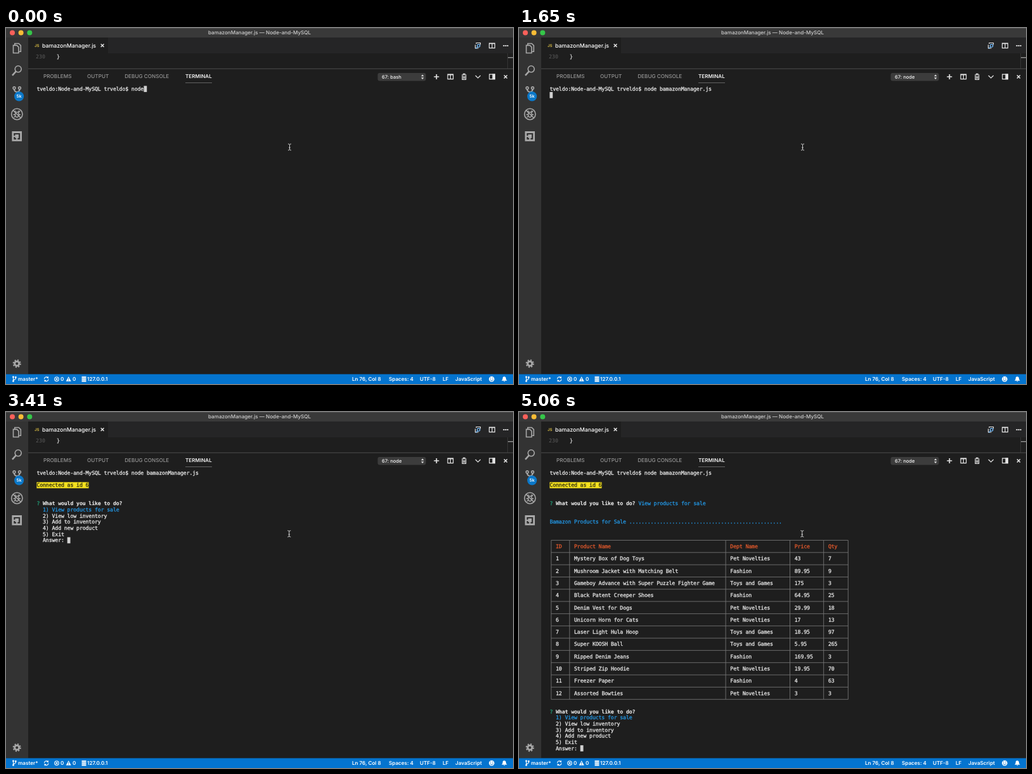
These frames come from a looping animation (800 by 562 pixels, 8 s). An HTML page:

```html
<!DOCTYPE html>
<html lang="en">
<head>
<meta charset="utf-8">
<title>Terminal session</title>
<style>
  html, body { margin: 0; width: 100%; height: 100%; overflow: hidden; background: #1e1e1e; }
  svg { display: block; width: 800px; height: 562px; }
  text { font-family: Inter, "Open Sans", sans-serif; font-size: 8.28px; white-space: pre; text-rendering: geometricPrecision; }
  .mono { font-family: "DejaVu Sans Mono", monospace; }
  #term text { font-family: "DejaVu Sans Mono", monospace; letter-spacing: -.155px; fill: currentColor; stroke: currentColor; stroke-width: .28px; }
  #term .bold { font-weight: 700; stroke-width: .1px; }
  .line { fill: none; stroke: #e4e4e4; stroke-width: 1.2; }
  .side { fill: none; stroke: #a8a8a8; stroke-width: 1.6; }
  .tabs { fill: #969696; font-weight: 500; }
  .tabs text { font-size: 8.18px; }
  .status { fill: #fff; font-weight: 600; }
  .status text { font-size: 8.1px; }
  .status .line { stroke: #fff; stroke-width: 1.1; }
</style>
</head>
<body>
<svg viewBox="0 0 800 562">
  <rect width="800" height="562" fill="#1e1e1e"/>

  <!-- title bar and editor -->
  <rect width="800" height="15" fill="#393939"/>
  <rect width="800" height=".8" fill="#555"/>
  <circle cx="10" cy="7.5" r="4" fill="#f9605a"/>
  <circle cx="23.6" cy="7.5" r="4" fill="#f8bc36"/>
  <circle cx="37.3" cy="7.5" r="4" fill="#35c649"/>
  <text x="319" y="10.4" fill="#d0d0d0" font-weight="500" style="font-size:8.15px">bamazonManager.js — Node-and-MySQL</text>
  <rect x="35" y="15" width="765" height="25" fill="#252526"/>
  <rect x="35" y="15" width="126" height="25" fill="#1e1e1e"/>
  <text x="45" y="30.4" fill="#cbb141" font-weight="700" style="font-size:6.2px">JS</text>
  <text x="57" y="30.8" fill="#fff" font-weight="500" style="font-size:8.8px">bamazonManager.js</text>
  <path class="line" d="M149.7 25.2l4.8 4.8m0-4.8l-4.8 4.8" style="stroke-width:1.5"/>
  <text class="mono" x="47" y="48.3" fill="#5a5a5a">230</text>
  <text class="mono" x="80" y="48.3" fill="#d4d4d4" stroke="#d4d4d4" stroke-width=".3">}</text>
  <path d="M791.5 40v24" stroke="#343434"/>
  <path d="M792 46.7h8" stroke="#a0a0a0" stroke-width="1.3"/>
  <path d="M35 64.3h765" stroke="#4b4b4b"/>

  <!-- editor actions -->
  <g class="line">
    <path d="M742 25v-1.5h6.5v3M740.5 26.5v5.5h5"/>
    <circle cx="745.6" cy="28" r="2.2" stroke="#75beff"/>
    <path d="M744 29.8l-2.6 2.7" stroke="#75beff"/>
    <path d="M762.5 24h8.8v7.6h-8.8zM767 24v7.6M762.5 24.7h8.8"/>
  </g>
  <path d="M784.5 28h8" stroke="#e4e4e4" stroke-width="2" stroke-dasharray="2 1"/>

  <!-- panel header -->
  <g class="tabs">
    <text x="59" y="78.8">PROBLEMS</text>
    <text x="128" y="78.8">OUTPUT</text>
    <text x="187.2" y="78.8">DEBUG CONSOLE</text>
    <text x="283" y="78.8" fill="#f2f2f2" font-weight="600" style="font-size:8.08px">TERMINAL</text>
  </g>
  <path d="M283 86.5h42" stroke="#6b6b6b" stroke-width=".9"/>
  <rect x="586.5" y="71" width="76" height="12.4" rx="3" fill="#3c3c3c"/>
  <text id="shell" x="593" y="80" fill="#f4f4f4" font-weight="500" style="font-size:7.6px"></text>
  <path d="M655 76.2l2.2-2.6 2.2 2.6zM655 78.3l2.2 2.6 2.2-2.6z" fill="#e4e4e4"/>
  <g class="line">
    <path d="M675.3 77h8M679.3 73v8" style="stroke-width:1.7"/>
    <path d="M697 73.2h8.6v7.4H697zM701.3 73.2v7.4M697 73.9h8.6"/>
    <path d="M719 74h7.6M721.5 73.7v-1.3h2.6v1.3M720 75v6.3h5.6V75M721.9 76v4M723.7 76v4"/>
    <path d="M740.7 75l4 4 4-4"/>
    <path d="M762.7 73.2h8.6v7.4h-8.6z"/>
    <path d="M768 73.2h3.3v7.4H768z" fill="#e4e4e4"/>
    <path d="M785.8 74.5l5 5m0-5l-5 5" style="stroke-width:1.6"/>
  </g>

  <!-- activity bar -->
  <rect y="15" width="35" height="531.5" fill="#333"/>
  <g class="side">
    <path d="M13.8 27v-2.5h6.3l3.2 3.2v9.5h-3"/>
    <path d="M11.5 27.4h5.6l2.8 2.8v9.3h-8.4z"/>
    <circle cx="19.2" cy="64.8" r="5"/>
    <path d="M15.6 68.7L10 74.8" stroke-width="2.5"/>
    <circle cx="13" cy="94.8" r="1.9"/>
    <circle cx="21.5" cy="94.8" r="1.9"/>
    <path d="M13 97q0 3 4.2 4.3 4.3-1.3 4.3-4.3M17.2 101v5" stroke-width="2"/>
    <circle cx="17.3" cy="136" r="8.7"/>
    <ellipse cx="17.3" cy="136.7" rx="2.8" ry="4"/>
    <path d="M11.2 130l12.2 12M11.5 136.7h3M20 136.7h3M12.5 141l2.5-2M22 131l-2.4 2.5M15.3 132.5l-1-2M19.3 132.5l1-2"/>
    <path d="M10.8 164.5h12.8v12.8H10.8z" stroke-width="2.8"/>
    <path d="M15.2 168.9h4v4h-4z" fill="#a8a8a8"/>
    <path d="M17.2 173v4M11 171h4" stroke-width="2.2"/>
    <circle cx="17.2" cy="529.8" r="3.5" stroke-width="2.8"/>
    <circle cx="17.2" cy="529.8" r="5.6" stroke-width="2" stroke-dasharray="2.2 2.198"/>
  </g>
  <circle cx="20.6" cy="107.8" r="7.6" fill="#0b78c9"/>
  <text x="20.6" y="110.3" fill="#fff" text-anchor="middle" font-weight="600" style="font-size:6.8px">5k</text>

  <!-- status bar -->
  <rect y="546.5" width="800" height="15.5" fill="#0474cf"/>
  <g class="status">
    <g class="line">
      <path d="M11.5 551.5v5.5M15.3 552v1q0 2-3.8 2.5"/>
      <circle cx="11.5" cy="551" r=".9"/>
      <circle cx="15.3" cy="551.5" r=".9"/>
      <circle cx="11.5" cy="557.5" r=".9"/>
      <path d="M60.5 554a3.2 3.2 0 0 1 5.8-1.8v-2M66.3 552.2h-2M66.900 554.5a3.2 3.2 0 0 1-5.800 1.800v2M61.1 556.3h2"/>
      <circle cx="80" cy="554.3" r="3.3"/>
      <path d="M78.6 552.9l2.8 2.8m0-2.8l-2.8 2.8"/>
      <path d="M119.5 551.3h7M119.5 554.3h7M119.5 557.3h7" style="stroke-width:2.3"/>
    </g>
    <path d="M98.7 550.2l4 7.6h-8z"/>
    <path d="M98.7 552.5v2.7m0 .7v1" stroke="#0474cf"/>
    <circle cx="766.3" cy="554.2" r="4.3"/>
    <path d="M764.7 551.8v1.6M767.9 551.8v1.6M763.7 555.2q2.6 3 5.2 0" fill="none" stroke="#0474cf"/>
    <path d="M782 556.8q1.7-1 1.7-3.8 0-2.5 2.6-2.7 2.6.2 2.6 2.7 0 2.8 1.7 3.8zM785 557.3h2.6l-1.3 1.2z"/>
    <text x="19" y="557.2">master*</text>
    <text x="86" y="557.2">0</text>
    <text x="105" y="557.2">0</text>
    <text x="128" y="557.2">127.0.0.1</text>
    <text x="546" y="557.2">Ln 76, Col 8</text>
    <text x="604" y="557.2">Spaces: 4</text>
    <text x="653" y="557.2">UTF-8</text>
    <text x="689" y="557.2">LF</text>
    <text x="709" y="557.2">JavaScript</text>
  </g>

  <g id="term"></g>
  <path id="mouse" d="M-2.5-5q2.500 0 2.500 1.500 0-1.500 2.500-1.500M0-4v8M-2.500 5q2.500 0 2.500-1.500 0 1.500 2.500 1.500M-1.300 1h2.600" fill="none" stroke="#ccc"/>
</svg>
<script>
const term = document.getElementById("term");
const shell = document.getElementById("shell");
const mouse = document.getElementById("mouse");

const LOOP = 8000, KEY = 110;
const CELL = 4.83, LINE = 9.66;
const WHITE = "#e8e8e8", BLUE = "#2396e3", GREEN = "#23a27a", ORANGE = "#e2592c";
const PROMPT = "tveldo:Node-and-MySQL trveldo$ ";
const COMMAND = "node bamazonManager.js";
const QUESTION = "What would you like to do?";
const CHOICES = ["View products for sale", "View low inventory", "Add to inventory", "Add new product", "Exit"];
const EDGES = [0, 6, 57, 78, 89, 97];
const PRODUCTS = `ID|Product Name|Dept Name|Price|Qty
1|Mystery Box of Dog Toys|Pet Novelties|43|7
2|Mushroom Jacket with Matching Belt|Fashion|89.95|9
3|Gameboy Advance with Super Puzzle Fighter Game|Toys and Games|175|3
4|Black Patent Creeper Shoes|Fashion|64.95|25
5|Denim Vest for Dogs|Pet Novelties|29.99|18
6|Unicorn Horn for Cats|Pet Novelties|17|13
7|Laser Light Hula Hoop|Toys and Games|18.95|97
8|Super KOOSH Ball|Toys and Games|5.95|265
9|Ripped Denim Jeans|Fashion|169.95|3
10|Striped Zip Hoodie|Pet Novelties|19.95|70
11|Freezer Paper|Fashion|4|63
12|Assorted Bowties|Pet Novelties|3|3`.split("\n").map(row => row.split("|"));

const colX = col => 48.4 + col * CELL;
const rowY = row => 91.4 + row * LINE;

const write = (row, col, str, color = WHITE, style = "") =>
  `<text x="${colX(col)}" y="${rowY(row) + 7.6}" color="${color}" class="${style}">${str}</text>`;
const block = (row, col, width = 1, fill = "#d0d0d0") =>
  `<rect x="${colX(col)}" y="${rowY(row)}" width="${width * CELL}" height="${LINE}" fill="${fill}"/>`;
const question = row => write(row, 0, "?", GREEN) + write(row, 2, QUESTION, WHITE, "bold");

function menu(row, answer) {
  const list = CHOICES.map((name, i) => write(row + 1 + i, 2, `${i + 1}) ${name}`, i ? WHITE : BLUE));
  return question(row) + list.join("") +
    write(row + 6, 2, "Answer: " + answer) + block(row + 6, 10 + answer.length);
}

function table(top) {
  const midX = col => colX(col + .5), midY = row => rowY(row + .5);
  const bottom = top + 2 * PRODUCTS.length;
  let path = EDGES.map(col => `M${midX(col)} ${midY(top)}V${midY(bottom)}`).join("");
  for (let row = top; row <= bottom; row += 2) path += `M${midX(0)} ${midY(row)}H${midX(97)}`;
  const cells = PRODUCTS.map((product, i) => product.map((cell, j) =>
    write(top + 1 + 2 * i, EDGES[j] + 2, cell, i ? WHITE : ORANGE)).join(""));
  return `<path d="${path}" fill="none" stroke="#737373" stroke-width=".9"/>` + cells.join("");
}

function screen(t) {
  // Typed one key per step, then completed at once.
  const typed = t < 1320 ? 4 + Math.floor(t / KEY) : COMMAND.length;
  let out = write(0, 0, PROMPT + COMMAND.slice(0, typed));
  if (t < 1540) return out + block(0, PROMPT.length + typed);
  if (t < 2530) return out + block(1, 0);
  out += block(2, 0, 17, "#f3e01e") + write(2, 0, "Connected as id 6", "#333010");
  if (t < 4620) return out + menu(5, t < 4180 ? "" : "1");
  return out + question(5) + write(5, 29, CHOICES[0], BLUE) +
    write(8, 0, "Bamazon Products for Sale " + ".".repeat(50), BLUE) + table(11) + menu(39, "");
}

let shown = "";
function frame() {
  const t = performance.now() % LOOP;
  const next = screen(t);
  if (next !== shown) term.innerHTML = shown = next;
  shell.textContent = t < 1650 ? "67: bash" : "67: node";
  const y = t < 2200 ? 188 : t < 2310 ? 190 : t < 2530 ? 191.5 : 192.2;
  mouse.setAttribute("transform", `translate(${t < 2200 ? 447.5 : 446.8} ${y})`);
  requestAnimationFrame(frame);
}
frame();
</script>
</body>
</html>
```
